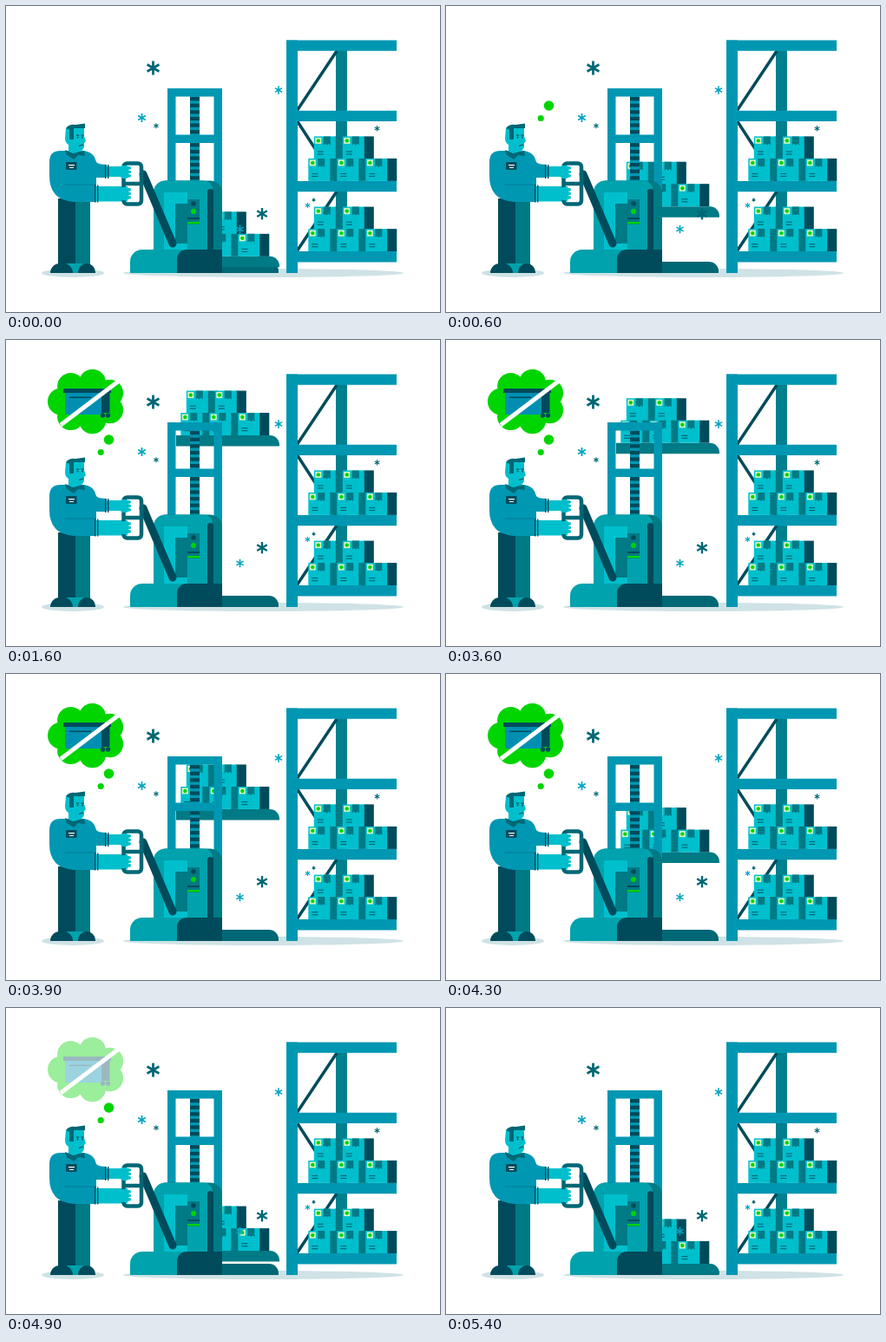
An HTML page with a canvas that plays this animation: 500x353 px, repeating every 5.8 s.

```html
<!DOCTYPE html>
<html lang="en">
<head>
<meta charset="utf-8">
<title>Warehouse lift</title>
<style>
html, body { margin: 0; width: 100%; height: 100%; overflow: hidden; background: #fff; }
canvas { display: block; width: 500px; height: 353px; }
</style>
</head>
<body>
<canvas id="stage" width="500" height="353"></canvas>
<script>
const ctx = document.getElementById('stage').getContext('2d');
const LOOP = 5800, STEP = 100;
const LOW = 295, HIGH = 110;
const BLUE = '#0097b2', CYAN = '#00bfcd', MID = '#00a2ad', TEAL = '#007a85', DARK = '#004b5b';
const INK = '#006775', GREEN = '#00d500', SKY = '#00a5c0', SHADE = '#cfe2e5';

const clamp = v => Math.max(0, Math.min(1, v));
const ramp = (t, from, to) => clamp((t - from) / (to - from));
const fade = (t, inAt, inEnd, outAt, outEnd) => ramp(t, inAt, inEnd) - ramp(t, outAt, outEnd);

// The fork starts gently, rises, rests, then sinks at an even speed.
// The rise begins one step before the loop restarts.
function liftY(t) {
  const start = LOOP - STEP;
  if (t > start) t -= LOOP;
  const up = ramp(t, -STEP, 1600) ** 1.2;
  return LOW - (LOW - HIGH) * (up - ramp(t, 3530, 5020));
}

function rect(color, x, y, w, h, r = 0) {
  ctx.fillStyle = color;
  ctx.beginPath();
  ctx.roundRect(x, y, w, h, r);
  ctx.fill();
}
function oval(color, x, y, rx, ry = rx) {
  ctx.fillStyle = color;
  ctx.beginPath();
  ctx.ellipse(x, y, rx, ry, 0, 0, Math.PI * 2);
  ctx.fill();
}
function line(color, width, x0, y0, x1, y1, cap = 'butt') {
  ctx.strokeStyle = color;
  ctx.lineWidth = width;
  ctx.lineCap = cap;
  ctx.beginPath();
  ctx.moveTo(x0, y0);
  ctx.lineTo(x1, y1);
  ctx.stroke();
}
function shape(color, d) {
  ctx.fillStyle = color;
  ctx.fill(new Path2D(d));
}

function flake(x, y, r, color) {
  for (let i = 0; i < 3; i++) {
    const a = Math.PI * (0.5 + i / 3), dx = Math.cos(a) * r, dy = Math.sin(a) * r;
    line(color, Math.max(1.1, r * 0.35), x - dx, y - dy, x + dx, y + dy);
  }
}

function box(x, y, side) {
  ctx.save();
  ctx.translate(x, y);
  rect(side, 24, 0, 12, 26);
  rect(CYAN, 0, 0, 25, 26);
  shape(TEAL, 'M11 0H19V10L17 8.3L15 10L13 8.3L11 10Z');
  rect('#d9f4c4', 1.5, 1.5, 7, 7);
  oval(GREEN, 5, 5, 2.2);
  for (const lineY of [17, 20]) rect(INK, 4, lineY, 7, 1.2);
  ctx.restore();
}
function row(count, x, y) {
  for (let i = 1; i <= count; i++) {
    box(x + (i - 1) * 33, y, i < count ? TEAL : DARK);
  }
}
function stack(x, base) {
  row(2, x + 6.5, base - 51.5);
  row(3, x, base - 26);
}

function rack() {
  const shelf = i => 39.5 + i * 81.2;
  rect('#00808f', 380, 46, 13, 240);
  line(DARK, 3.5, 335, 121, 381, 52);
  line(DARK, 3.5, 335, 132, 381, 203);
  line(DARK, 3.5, 335, 283, 381, 214);
  stack(348.3, shelf(2));
  stack(348.3, shelf(3));
  for (let i = 0; i < 4; i++) rect(BLUE, 323, shelf(i), 127, 12.3);
  rect(BLUE, 323, 39.5, 13, 268.5);
}

function load(y) {
  rect(TEAL, 196, y, 119, 12.5, [0, 11, 0, 0]);
  stack(201.3, y);
}

function mast() {
  rect(BLUE, 212, 104, 11, 100);
  for (let y = 105; y < 202; y += 7.6) rect(DARK, 212, y, 11, 4.3);
  for (const y of [95, 148.5]) rect(BLUE, 186, y, 63, 9.5);
  for (const x of [186, 239.5]) rect(BLUE, x, 95, 9.5, 120);
}

function truck() {
  rect(TEAL, 170, 201.5, 79, 84, [14, 14, 0, 0]);
  rect(MID, 170, 201.5, 68, 84, [14, 10, 0, 0]);
  rect(CYAN, 182, 215, 27, 68);
  rect(TEAL, 195, 228, 14, 46);
  // control panel
  rect(TEAL, 209, 223, 14, 29);
  rect(DARK, 232, 211, 7, 72, [5, 5, 0, 0]);
  oval(DARK, 216, 228, 2.8);
  oval(GREEN, 216, 237, 3);
  rect(DARK, 209, 244, 14, 2);
  rect(GREEN, 209, 249, 14, 2.4);
  // base
  rect(MID, 143, 281, 60, 27, [14, 0, 0, 0]);
  rect(DARK, 197, 281, 52, 27, [11, 0, 0, 0]);
  line(DARK, 9, 158, 194, 192, 274, 'round');
}

function handle() {
  ctx.strokeStyle = INK;
  ctx.lineWidth = 4.5;
  ctx.beginPath();
  ctx.roundRect(135.5, 181.5, 20.5, 47, 4);
  ctx.moveTo(135, 205);
  ctx.lineTo(156, 205);
  ctx.stroke();
}

function man() {
  // legs and shoes
  rect(TEAL, 79, 222, 18, 78);
  rect(DARK, 60, 222, 20, 78);
  rect(MID, 70, 297, 20, 11);
  rect(DARK, 51, 297, 26, 11, [11, 11, 0, 0]);
  rect(DARK, 83, 297, 20, 11, [10, 10, 0, 0]);
  // far arm
  rect(CYAN, 112, 185, 27, 12);
  shape(BLUE, 'M92 172Q101 173 104 180Q106 183 116 183V198H94Z');
  // torso and near sleeve
  shape(BLUE, 'M50 180Q50 167 63 167H90Q103 169 104 182V226H78Q50 224 50 196Z');
  line('#0085a0', 1.5, 68, 206, 104, 206);
  // head
  shape(CYAN, 'M69 141H90V150L92 156L90 158V162Q89 168 82 168V172H72V160Q68 158 68 152Z');
  shape(INK, 'M69 141Q73 136 80 137L91 135.5V141H78V154H73V143Z');
  for (const x of [82, 87.5]) {
    rect(DARK, x - 1, 148.5, 3.2, 1.2);
    oval(DARK, x + 0.5, 151.5, 0.9);
  }
  line(DARK, 1.2, 84, 161.5, 89, 160);
  shape(INK, 'M68 166L77 170L90 167L91 173L83 172L78 177L70 172Z');
  // badge
  rect(DARK, 69, 180, 12.5, 9, 1);
  rect('#fff', 72, 183, 7, 1.2);
  rect('#fff', 73, 186, 5, 1);
  // near arm and cuffs
  rect(CYAN, 102, 208, 38, 17.5);
  for (const x of [0, 3]) {
    rect(DARK, 102 + x, 206.5, 1.4, 20);
    rect(DARK, 114 + x, 183, 1.4, 16);
  }
}
function hands() {
  for (const y of [184, 209]) {
    rect(CYAN, 132, y, 9, 15, 3);
    for (let i = 0; i < 3; i++) rect(CYAN, 136, y + 1 + i * 4.5, 8, 3.7, 1.8);
  }
}

function bubble(alpha) {
  if (!alpha) return;
  oval(GREEN, 93, 71, 30, 22);
  for (let i = 0; i < 7; i++) {
    const a = Math.PI * (1 + 2 * i / 7);
    oval(GREEN, 93 + 29.5 * Math.cos(a), 71 + 22.3 * Math.sin(a), 15.5);
  }
  rect('#008fb3', 68, 60, 43, 26);
  rect(DARK, 66, 56, 55, 5);
  rect(DARK, 73, 65.5, 25, 1.5);
  rect(DARK, 110, 60, 9.5, 24);
  for (const x of [111.5, 117.5]) oval(DARK, x, 87, 2.7);
  line('#fff', 5, 63, 98, 131, 46.5);
  // a white veil fades the whole picture as one
  ctx.globalAlpha = 1 - alpha;
  rect('#fff', 46, 31, 94, 79);
  ctx.globalAlpha = 1;
}
function dot(x, y, r, alpha) {
  ctx.globalAlpha = alpha;
  oval(GREEN, x, y, r);
  ctx.globalAlpha = 1;
}

function flakes() {
  flake(169.5, 71.5, 8, INK);
  flake(156.5, 129, 5, SKY);
  flake(173, 138.3, 3, INK);
  flake(314, 97, 4.7, SKY);
  flake(427.5, 141.3, 3.2, INK);
  flake(295, 239.7, 6.7, INK);
  flake(269.5, 257.5, 4.7, SKY);
  flake(347.5, 230, 3, SKY);
  flake(354.5, 223.7, 2, INK);
}

function draw(t) {
  rect('#fff', 0, 0, 500, 353);
  oval(SHADE, 77, 308, 36, 5);
  oval(SHADE, 296.5, 308, 161.5, 5);
  rack();
  rect(INK, 240, 295, 74, 13, [0, 11, 0, 0]);
  load(liftY(t));
  mast();
  truck();
  man();
  handle();
  hands();
  flakes();
  bubble(fade(t, 600, 900, 4700, 5030));
  dot(118.5, 115, 5.8, fade(t, 300, 600, 4900, 5200));
  dot(109.2, 129.5, 3.6, fade(t, 0, 300, 5100, 5400));
}

function tick() {
  const t = performance.now() % LOOP;
  draw(Math.floor(t / STEP) * STEP);
  requestAnimationFrame(tick);
}
tick();
</script>
</body>
</html>
```
